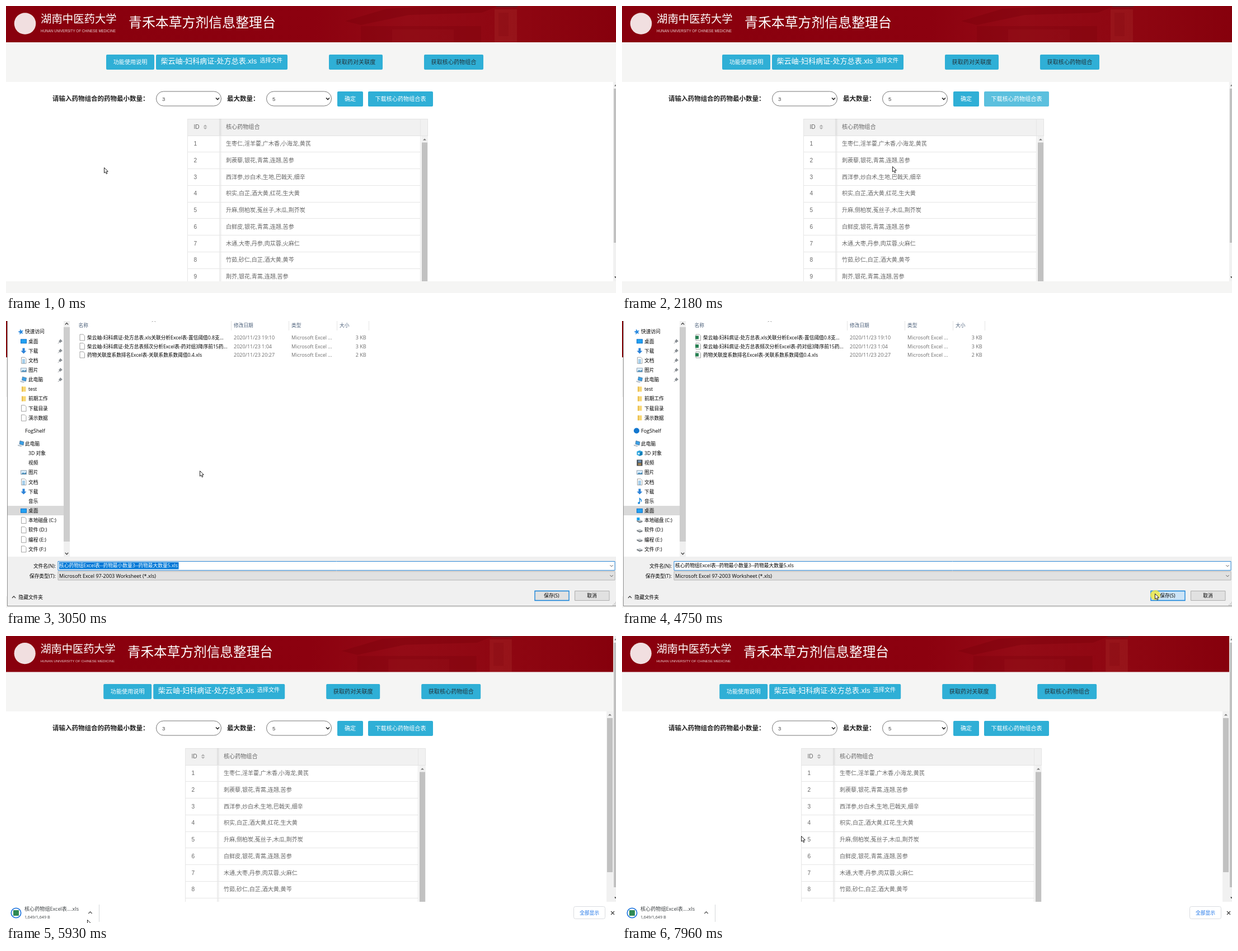
Write an HTML page with a canvas that moves like this. It is 1090x514 px and loops after 8000 ms.

```html
<!DOCTYPE html>
<html lang="zh-CN">
<head>
<meta charset="utf-8">
<title>核心药物组合</title>
<style>
html, body { margin: 0; width: 100%; height: 100%; overflow: hidden; background: #fff; }
canvas { display: block; }
</style>
</head>
<body>
<canvas id="stage" width="1090" height="514"></canvas>
<script>
const c = document.getElementById('stage').getContext('2d');
const LOOP = 8000;
const WEB = '"Liberation Sans", "Noto Sans CJK SC", "Noto Sans CJK", sans-serif';
const SYS = '"Open Sans", "Noto Sans CJK SC", "Noto Sans CJK", sans-serif';
const CJK = '"Noto Sans CJK SC", "Noto Sans CJK", sans-serif';
const BOOK = '柴云岫-妇科病证-处方总表';
const TITLE = '青禾本草方剂信息整理台';
const OUTPUT = '核心药物组Excel表--药物最小数量3--药物最大数量5.xls';

// Screen refreshes come in bursts: start, end, number of steps
const bursts = [
  [630, 1410, 11], [1490, 1560, 2], [1800, 2330, 8], [2500, 3290, 11], [3350, 4130, 11],
  [4210, 4920, 10], [5030, 5780, 11], [5850, 6620, 11], [6700, 7300, 9], [7470, 7960, 7]
];

// Pointer path: time, x, y
const path = [
  [555, 175, 289], [1410, 696, 165], [1725, 696, 165], [1876, 712, 172], [2180, 483, 287],
  [2330, 385, 288], [2420, 385, 288], [2820, 347, 273], [2895, 347, 273], [3053, 346, 268],
  [3272, 346, 268], [3980, 935, 502], [4130, 946, 500], [4600, 952, 488], [4950, 952, 488],
  [5780, 146, 510], [5927, 145, 508], [6312, 434, 277], [6620, 258, 379], [6700, 250, 385],
  [7300, 140, 475], [7390, 140, 475], [7552, 146, 485], [7960, 320, 358]
];

const herbs = [
  '生枣仁,淫羊藿,广木香,小海龙,黄芪', '刺蒺藜,银花,青蒿,连翘,苦参', '西洋参,炒白术,生地,巴戟天,细辛',
  '枳实,白芷,酒大黄,红花,生大黄', '升麻,侧柏炭,菟丝子,木瓜,荆芥炭', '白鲜皮,银花,青蒿,连翘,苦参',
  '木通,大枣,丹参,肉苁蓉,火麻仁', '竹茹,砂仁,白芷,酒大黄,黄芩', '荆芥,银花,青蒿,连翘,苦参'
];

// Label, icon, icon before loading
const quick = [
  ['桌面', 'screen'], ['下载', 'down'], ['文档', 'doc'], ['图片', 'photo'], ['此电脑', 'pc'],
  ['test', 'folder'], ['前期工作', 'folder'], ['下载目录', 'folder', 'blank'], ['演示数据', 'folder', 'blank']
];
const places = [
  ['3D 对象', 'cube', ''], ['视频', 'film', ''], ['图片', 'photo'], ['文档', 'doc'], ['下载', 'down'],
  ['音乐', 'note', ''], ['桌面', 'screen'], ['本地磁盘 (C:)', 'system', 'blank'], ['软件 (D:)', 'disk', 'blank'],
  ['编程 (E:)', 'disk', 'blank'], ['文件 (F:)', 'disk', 'blank']
];
const files = [
  [BOOK + '.xls关联分析Excel表-置信阈值0.8支...', '2020/11/23 19:10', '3 KB'],
  [BOOK + '频次分析Excel表-药对组3降序前15药...', '2020/11/23 1:04', '3 KB'],
  ['药物关联度系数排名Excel表-关联系数系数阈值0.4.xls', '2020/11/23 20:27', '2 KB']
];

function rect(x, y, w, h, fill) {
  c.fillStyle = fill;
  c.fillRect(x, y, w, h);
}

function box(x, y, w, h, r, fill, stroke, lw = 1) {
  c.beginPath();
  c.roundRect(x, y, w, h, r);
  if (fill) { c.fillStyle = fill; c.fill(); }
  if (stroke) { c.strokeStyle = stroke; c.lineWidth = lw; c.stroke(); }
}

function poly(pts, fill, stroke, lw = 1, close = true) {
  c.beginPath();
  for (let i = 0; i < pts.length; i += 2) c.lineTo(pts[i], pts[i + 1]);
  if (close) c.closePath();
  if (fill) { c.fillStyle = fill; c.fill(); }
  if (stroke) { c.strokeStyle = stroke; c.lineWidth = lw; c.stroke(); }
}

function disc(x, y, r, fill) {
  c.beginPath();
  c.arc(x, y, r, 0, 7);
  c.fillStyle = fill;
  c.fill();
}

function ring(x, y, r, color, lw) {
  c.beginPath();
  c.arc(x, y, r, 0, 7);
  c.strokeStyle = color;
  c.lineWidth = lw;
  c.stroke();
}

// y is the middle of the line
function text(s, x, y, size, color, font = WEB, align = 'left', weight = 400) {
  c.font = `${weight} ${size}px ${font}`;
  c.textAlign = align;
  c.fillStyle = color;
  c.fillText(s, x, y + size * 0.37);
}

function chevron(x, y, w, h, color, lw) {
  poly([x - w, y - h, x, y + h, x + w, y - h], null, color, lw, false);
}

function triangle(x, y, w, h, color) {
  poly([x - w, y + h, x, y - h, x + w, y + h], color);
}

function button(x, y, w, label, color = '#fff', fill = '#2fafd6') {
  box(x, y, w, 27, 2, fill);
  text(label, x + w / 2, y + 13, 10.15, color, WEB, 'center');
}

function select(x, y, value) {
  box(x + .5, y + .5, 116, 26, 13, '#fff', '#777');
  text(value, x + 11, y + 13.5, 9.5, '#444');
  chevron(x + 110, y + 13.5, 3, 1.6, '#222', 1.5);
}

function header(k) {
  c.save();
  c.scale(k, k);
  const g = c.createLinearGradient(0, 0, 1101, 0);
  [[0, '#89000d'], [.5, '#8c010f'], [.65, '#940b16'], [.84, '#8e0611'], [1, '#86000c']]
    .forEach(([p, col]) => g.addColorStop(p, col));
  rect(0, 0, 1101, 65.5, g);
  poly([606, 27, 680, 5, 770, 0, 880, 0, 850, 12, 720, 16, 634, 34], 'rgba(120,0,10,.4)');
  rect(634, 36, 215, 29.5, 'rgba(120,0,10,.3)');
  rect(690, 42, 110, 23.5, 'rgba(165,30,35,.18)');
  rect(873, 6, 40, 59.5, 'rgba(170,50,45,.3)');
  rect(880, 12, 18, 42, 'rgba(120,0,10,.2)');
  rect(876, 0, 38, 2, 'rgba(60,50,50,.5)');
  disc(34, 31.5, 19.3, '#f1dfe0');
  text('湖南中医药大学', 62, 23, 19.4, '#fff', CJK);
  text('HUNAN UNIVERSITY OF CHINESE MEDICINE', 62, 45, 6.27, '#ecd3d4');
  text(TITLE, 219, 29, 23.9, '#fff', CJK);
  c.restore();
}

function table(x, y, bottom) {
  const row = 29.78;
  c.save();
  c.beginPath();
  c.rect(x, y, 431, bottom - y);
  c.clip();
  rect(x, y, 430, 30, '#f1f1f1');
  rect(x, y, 430, 1, '#e3e3e3');
  rect(x, y, 1, 400, '#e6e6e6');
  rect(x + 429, y, 1, 30, '#e3e3e3');
  rect(x + 416, y, 1, 400, '#e6e6e6');
  const g = c.createLinearGradient(x + 56, 0, x + 62, 0);
  g.addColorStop(0, 'rgba(0,0,0,0)');
  g.addColorStop(.4, 'rgba(0,0,0,.08)');
  g.addColorStop(1, 'rgba(0,0,0,0)');
  rect(x + 56, y, 6, 400, g);
  text('ID', x + 11.5, y + 14.5, 10.1, '#666');
  triangle(x + 32, y + 12.2, 3.5, 1.7, '#b2b2b2');
  triangle(x + 32, y + 17.2, 3.5, -1.7, '#b2b2b2');
  text('核心药物组合', x + 69, y + 14.5, 10.1, '#666');
  rect(x, Math.round(y + 29.5), 430, 1, '#e3e3e3');
  herbs.forEach((s, i) => {
    const top = y + 30 + row * i;
    text(i + 1, x + 11.5, top + 14.3, 10.1, '#666');
    text(s, x + 69, top + 14.3, 10.06, '#666');
    rect(x, Math.round(top + row - .5), 416, 1, '#e6e6e6');
  });
  rect(x + 418, y + 31, 12, 400, '#f1f1f1');
  triangle(x + 424, y + 37, 3, 1.5, '#777');
  rect(x + 419, y + 42.5, 10, 400, '#c1c1c1');
  c.restore();
}

function page(narrow, lit) {
  const dy = narrow ? -1 : 0, dx = narrow ? -4.8 : 0;
  rect(0, 0, 1090, 514, '#fff');
  header(narrow ? .99 : 1);
  rect(0, 65 + dy / 2, 1090, 71 + dy / 2, '#f5f5f4');
  button(179 + dx, 87 + dy, 86, '功能使用说明');
  box(268 + dx, 87 + dy, 235, 27, 2, '#2fafd6');
  text(BOOK + '.xls', 276.5 + dx, 98 + dy, 13.05, '#fff');
  text('选择文件', 453.5 + dx, 97.5 + dy, 10.15, '#fff');
  button(577 + dx, 87 + dy, 96, '获取药对关联度', '#22333b');
  button(747 + dx, 87 + dy, 106, '获取核心药物组合', '#22333b');

  text('请输入药物组合的药物最小数量：', 83, 166 + dy, 11.5, '#222', CJK, 'left', 700);
  select(268, 152.5 + dy, 3);
  text('最大数量：', 395, 166 + dy, 11.5, '#222', CJK, 'left', 700);
  select(465, 152.5 + dy, 5);
  button(592, 153 + dy, 46, '确定');
  button(647, 153 + dy, 116, '下载核心药物组合表', '#fff', lit ? '#5bc0de' : '#2fafd6');
  table(narrow ? 320 : 324, narrow ? 201 : 202, narrow ? 476 : 493);

  if (narrow) {
    rect(1073, 134.5, 12, 341.5, '#f1f1f1');
    triangle(1079, 141, 3, 1.5, '#777');
    rect(1074, 147, 10, 276, '#c1c1c1');
    rect(1085, 0, 5, 476, '#f1f1f1');
    rect(1086, 12, 4, 438, '#c1c1c1');
    triangle(1089, 6, 2, 1.5, '#777');
    triangle(1089, 469, 2, -1.5, '#444');
  } else {
    rect(0, 493, 1090, 21, '#f5f5f4');
    rect(1085, 136, 5, 357, '#f1f1f1');
    triangle(1089, 142, 2, 1.5, '#777');
    rect(1086, 148, 4, 276, '#c1c1c1');
    triangle(1089, 486, 2, -1.5, '#444');
  }
}

function downloads(shown) {
  c.save();
  c.translate(0, 38 * (1 - shown));
  rect(0, 476, 1090, 38, '#fff');
  ring(18, 496, 8.7, '#2a7de1', 1.8);
  rect(13, 491, 10, 10, '#2f8a55');
  text('核心药物组Excel表....xls', 33, 489, 9.1, '#3c4043', SYS);
  text('1,649/1,649 B', 33, 503, 7.2, '#3c4043', SYS);
  chevron(150.5, 495.5, 3.2, -1.7, '#444', 1.2);
  rect(166, 481, 1, 31, '#d5d7da');
  box(1014.5, 484.5, 56, 22, 3, '#fff', '#dadce0');
  text('全部显示', 1042.5, 495.7, 8.8, '#1a73e8', SYS, 'center');
  poly([1081, 493, 1087, 499], null, '#444', 1.3, false);
  poly([1087, 493, 1081, 499], null, '#444', 1.3, false);
  c.restore();
}

const blue = '#1787dc';
const icons = {
  screen() { rect(-5.5, -4, 11, 8, '#0f72c9'); rect(-4.5, -3, 9, 6, '#22a1f2'); },
  down() { poly([-2, -5, 2, -5, 2, 0, 5, 0, 0, 5, -5, 0, -2, 0], '#2d83d8'); },
  blank() { poly([-4, -5.5, 2, -5.5, 4.5, -3, 4.5, 5.5, -4, 5.5], '#fff', '#8c8c8c', .8); },
  doc() {
    icons.blank();
    for (let y = -2; y < 5; y += 2) rect(-2.5, y, 5, 1, '#4f9dd4');
  },
  photo() {
    box(-5, -3.5, 10, 7, 0, '#d8ecfa', '#8795a2', .8);
    poly([-4.5, 3, -1, 0, 1, 1.5, 4.5, 0, 4.5, 3], '#3f86b5');
  },
  pc() {
    poly([-2, -5, 5, -3, 4, 3, -3, 1], '#3ba0e6', '#46698a', .7);
    poly([-6, 2, 2, 4, 0, 5.5, -6, 4], '#aebac5');
  },
  folder() { box(-3.5, -4.5, 7.5, 9, .5, '#f8d775'); rect(-3.5, -4.5, 2, 9, '#e9bd4b'); },
  cube() {
    poly([0, -5, 5, -3, 5, 3, 0, 5, -5, 3, -5, -3], '#2ca3dc');
    poly([0, -1, 5, -3, 5, 3, 0, 5], '#137cb5');
    rect(-3, -1, 3, 3, '#dff4ff');
  },
  film() {
    rect(-5, -5.5, 10, 11, '#3b4148');
    rect(-3, -4.5, 6, 4, '#7294b2');
    rect(-3, .5, 6, 4, '#a78655');
  },
  note() {
    poly([0, 3, 0, -5, 3, -2, 3, 1], null, blue, 1.4, false);
    disc(-1.3, 3.3, 1.9, blue);
  },
  disk() {
    poly([-5, 0, 1, -1, 5, 1, 5, 3, 0, 4.5, -5, 2], '#6f757b');
    poly([-5, 0, 1, -1, 5, 1, 0, 2.5], '#c4c9cd');
  },
  system() { icons.disk(); rect(-5, -5, 5, 5, '#19a0e8'); },
  star() {
    const p = [];
    for (let i = 0; i < 10; i++) {
      const r = i % 2 ? 2.3 : 5.3, a = i * Math.PI / 5 - 1.8;
      p.push(r * Math.cos(a), r * Math.sin(a));
    }
    poly(p, '#2d8be0');
  },
  pin() {
    poly([0, -4, 4, 0, 2, 1, 0, 3, -3, 0, -1, -2], '#8a8f94');
    poly([-4, 4, -1, 1], null, '#8a8f94', 1, false);
  },
  sheet() { icons.blank(); rect(-5, -3, 6, 6, '#278052'); }
};

function icon(kind, x, y) {
  if (!kind) return;
  c.save();
  c.translate(x, y);
  icons[kind]();
  c.restore();
}

function sidebar(loaded) {
  const item = ([label, kind, early = kind], y) => {
    icon(loaded ? kind : early, 31.5, y);
    text(label, 40, y, 8.7, '#000', SYS);
  };
  icon('star', 26.5, 19.5);
  text('快速访问', 34, 19, 8.7, '#000', SYS);
  quick.forEach((q, i) => {
    const y = 36.3 + 17.15 * i;
    item(q, y);
    if (i < 5) icon('pin', 97, y);
  });
  if (loaded) disc(26, 196.5, 5, '#1377cf');
  text('FogShelf', 34, 196.5, 9, '#000', SYS);
  icon('pc', 27, 219.5);
  text('此电脑', 34, 219.5, 8.7, '#000', SYS);
  rect(3, 331, 100, 17, '#d9d9d9');
  places.forEach((p, i) => item(p, 236.8 + 17.17 * i));
}

function dialog(t, scale, hover) {
  const ready = t >= 3045;
  c.save();
  c.translate(545, 256);
  c.scale(scale, scale);
  c.translate(-545, -256);
  rect(2, -8, 1090, 519, '#fff');
  rect(2, 422, 1090, 89, '#f0f0f0');
  if (ready) sidebar(t >= 3200);
  rect(103, -8, 11, 430, '#f0f0f0');
  rect(103, 11, 11, 384, '#cdcdcd');
  chevron(108.5, 5, 2.7, -1.5, '#444', 1.2);
  chevron(108.5, 416.5, 2.7, 1.5, '#444', 1.2);

  [['名称', 129.5], ['修改日期', 407], ['类型', 510], ['大小', 596]]
    .forEach(([s, x]) => text(s, x, 8, 8.7, '#4c607a', SYS));
  [402, 505, 591, 648].forEach(x => rect(x, -4, 1, 21, '#e5e5e5'));
  chevron(264, 0, 3, -1.5, '#777', 1);
  if (ready) {
    files.forEach(([name, date, size], i) => {
      const y = 30 + 15.5 * i;
      icon(t >= 3500 ? 'sheet' : 'blank', 136, y - .5);
      text(name, 145, y, 8.7, '#000', SYS);
      text(date, 407, y, 9, '#6d6d6d', SYS);
      text('Microsoft Excel ...', 510, y, 9, '#6d6d6d', SYS);
      text(size, 643.5, y, 9, '#6d6d6d', SYS, 'right');
    });
  } else {
    text('正在处理...', 584, 34, 8.7, '#333', SYS);
  }

  text('文件名(N):', 89, 438.5, 8.7, '#000', SYS, 'right');
  text('保存类型(T):', 89, 456.5, 8.7, '#000', SYS, 'right');
  box(93, 430.5, 995, 16, 0, '#fff', '#2a86d4');
  const selected = t < 3600;
  if (selected) rect(95, 432, 213.5, 12.5, '#0078d7');
  text(OUTPUT, 95, 438.2, 8.73, selected ? '#fff' : '#000', SYS);
  box(93, 448.5, 995, 15.5, 0, '#e1e1e1', '#b5b5b5');
  text('Microsoft Excel 97-2003 Worksheet (*.xls)', 95, 456.2, 9, '#000', SYS);
  chevron(1082, 438.5, 2.6, 1.3, '#555', 1);
  chevron(1082, 456.5, 2.6, 1.3, '#555', 1);

  if (ready) {
    chevron(14, 494.5, 3, -1.6, '#333', 1.3);
    text('隐藏文件夹', 22.5, 494.5, 8.7, '#000', SYS);
    box(945, 483.5, 61, 17, 0, hover ? '#cce4f7' : '#e1e1e1', '#0f7fd8', 1.3);
    text('保存(S)', 975, 492, 8.7, '#000', SYS, 'center');
    box(1016.5, 483.5, 61.5, 17, 0, '#e1e1e1', '#adadad');
    text('取消', 1047, 492, 8.7, '#000', SYS, 'center');
    for (let i = 0; i < 3; i++)
      for (let j = 0; j <= i; j++) rect(1089 - j * 2.5, 503 + i * 2.5, 1.5, 1.5, '#b5b5b5');
  }
  rect(2, -8, 1, 519, '#8c8c8c');
  rect(1091, -8, 1, 519, '#8c8c8c');
  rect(2, 510, 1090, 1, '#8c8c8c');
  c.restore();
}

function pointer(x, y, busy, click) {
  if (click) disc(x + 1, y + 3, 9, 'rgba(240,232,60,.8)');
  c.save();
  c.translate(x + .5, y + .5);
  poly([0, 0, 0, 9.5, 2.2, 7.6, 3.8, 11.2, 5.4, 10.5, 3.9, 7, 6.8, 6.8], '#fff', '#222', 1);
  c.restore();
  if (busy) ring(x + 8, y, 3.4, '#1b86d9', 2.6);
}

function snap(t) {
  let last = 0;
  for (const [a, b, n] of bursts) {
    if (t + 12 < a) break;
    const step = (b - a) / (n - 1);
    last = a + step * Math.min(n - 1, Math.floor((t + 12 - a) / step));
  }
  return last;
}

function locate(t) {
  if (t <= path[0][0]) return path[0].slice(1);
  const i = path.findIndex(p => p[0] >= t);
  if (i < 0) return path[path.length - 1].slice(1);
  const [t0, x0, y0] = path[i - 1], [t1, x1, y1] = path[i];
  let k = (t - t0) / (t1 - t0);
  k = k * k * (3 - 2 * k);
  return [x0 + (x1 - x0) * k, y0 + (y1 - y0) * k];
}

function fade(t) {
  if (t < 2800 || t >= 4915) return 0;
  if (t < 2880) return .35;
  if (t < 2960) return .73;
  return t < 4835 ? 1 : .5;
}

function draw(time) {
  const t = snap(time), [x, y] = locate(t).map(Math.round);
  const over = (l, top, r, b) => x >= l && x <= r && y >= top && y <= b;
  const narrow = t >= 5025;
  page(narrow, over(647, 153, 763, 180) || (t > 1400 && t < 5025));
  if (narrow) downloads(Math.min(1, (t - 4950) / 230));
  const a = fade(t);
  if (a) {
    c.globalAlpha = a;
    dialog(t, .95 + .05 * a, over(945, 483, 1006, 501));
    c.globalAlpha = 1;
  }
  const click = (t >= 1485 && t < 1555) || (t >= 4755 && t < 4835);
  pointer(x, y, t >= 2500 && t < 3000, click);
}

function tick(now) {
  draw(now % LOOP);
  requestAnimationFrame(tick);
}
draw(0);
requestAnimationFrame(tick);
</script>
</body>
</html>
```
